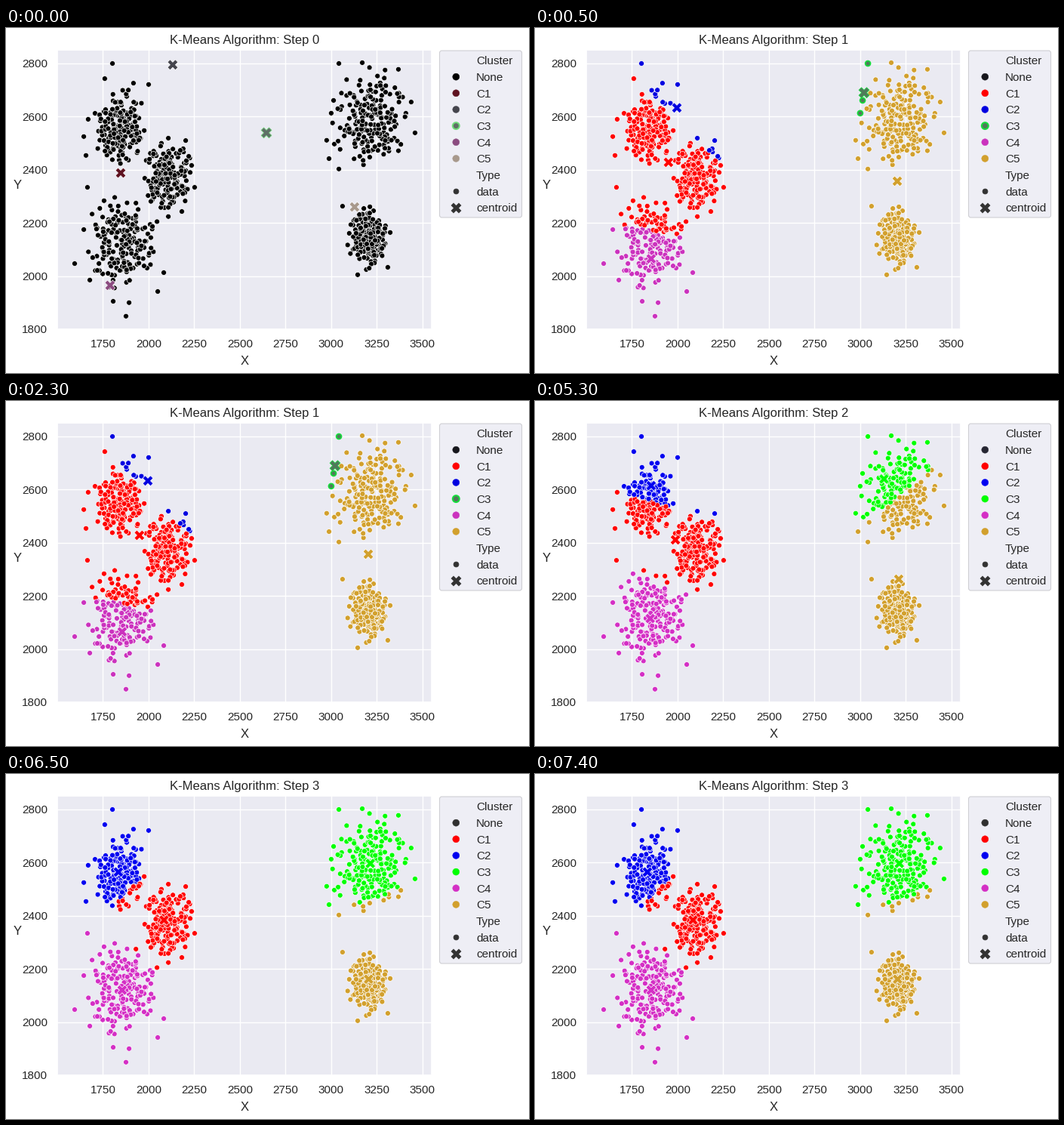
Write a matplotlib script that moves like this. It is 693 px wide and 457 px high and loops after 8 s.

```python
import numpy as np
import matplotlib.pyplot as plt
from matplotlib.animation import FuncAnimation
from matplotlib.patches import FancyBboxPatch

W, H, DPI = 693, 457, 100
INK = "#262626"
PANEL = "#eaeaf2"

plt.rcParams["font.family"] = "Liberation Sans"
plt.rcParams["text.color"] = INK

# Each blob: centre, spread, core size and a few stragglers
BLOBS = [
    ((1847, 2560), (66, 62), 213,
     [(1802, 2800), (1760, 2743), (2000, 2721), (1917, 2726),
      (1645, 2525), (1657, 2454), (1669, 2590), (1665, 2334)]),
    ((2102, 2378), (61, 56), 190,
     [(2108, 2519), (2203, 2510), (2252, 2334), (2108, 2224),
      (2046, 2205), (2182, 2243)]),
    ((1847, 2135), (82, 84), 187,
     [(1595, 2047), (1645, 2175), (2050, 1942), (2083, 2013),
      (1876, 1849), (1806, 1905), (1893, 1900), (1678, 1985)]),
    ((3207, 2595), (95, 86), 198,
     [(3042, 2800), (3170, 2803), (3368, 2778), (3438, 2655), (3459, 2539),
      (2975, 2511), (2988, 2442), (3013, 2661), (3000, 2613), (3042, 2403)]),
    ((3203, 2141), (51, 53), 197,
     [(3062, 2263), (3310, 2033), (3145, 2005), (3323, 2164)]),
]

CENTROIDS = [
    [(1847, 2388), (2132, 2795), (2645, 2539), (1789, 1965), (3128, 2260)],
    [(1950, 2428), (1996, 2633), (3021, 2690), (1855, 2065), (3203, 2357)],
    [(1988, 2411), (1855, 2615), (3130, 2640), (1850, 2115), (3211, 2263)],
]

# Colours per step: None, C1 ... C5
PALETTES = [
    ["#000000", "#5f1220", "#45454d", "#5f6f66", "#8b4c80", "#a8998c"],
    ["#16161c", "#ff0000", "#0000e0", "#4f7a5a", "#cb32be", "#d2a02d"],
    ["#262632", "#ff0000", "#0000f0", "#00ff00", "#d42fc5", "#d2a02d"],
    ["#303030", "#ff0000", "#0000f0", "#00ff00", "#d42fc5", "#d2a02d"],
]
GREEN_RIMS = {0: "#70dc7a", 1: "#14e03c"}

SCHEDULE = [0] + [1] * 6 + [2] * 6 + [3] * 3
INTERVAL = 500


def make_points():
    rng = np.random.default_rng(7)
    groups = []
    for centre, spread, count, stragglers in BLOBS:
        z = rng.normal(size=(3 * count, 2))
        z = z[np.hypot(z[:, 0], z[:, 1]) < 2.35][:count]
        groups += [np.array(centre) + z * spread, np.array(stragglers)]
    return rng.permutation(np.vstack(groups))


def nearest(points, centroids):
    gaps = points[:, None, :] - np.array(centroids)[None, :, :]
    return (gaps ** 2).sum(axis=2).argmin(axis=1) + 1


points = make_points()
labels = [np.zeros(len(points), int)] + [nearest(points, c) for c in CENTROIDS]
CENTROIDS.append([tuple(points[labels[3] == k].mean(axis=0)) for k in range(1, 6)])

fig = plt.figure(figsize=(W / DPI, H / DPI), dpi=DPI, facecolor="white")

# Plot area
ax = fig.add_axes([68 / W, 58 / H, 496 / W, 369.6 / H], facecolor=PANEL)
ax.set_xlim(1500, 3550)
ax.set_ylim(1800, 2850)
ax.set_xticks(range(1750, 3501, 250))
ax.set_yticks(range(1800, 2801, 200))
ax.set_axisbelow(True)
ax.grid(color="white", linewidth=1)
ax.tick_params(length=0, pad=9.5, labelsize=11, labelcolor=INK)
for spine in ax.spines.values():
    spine.set(color="white", linewidth=1.25)

dots = ax.scatter(*points.T, s=25, linewidth=0.5, edgecolor="white", zorder=3)
crosses = ax.scatter(*np.array(CENTROIDS[0]).T, s=100, marker="X",
                     linewidth=0.5, edgecolor="white", zorder=4)

# Labels and legend, laid out in pixels
page = fig.add_axes([0, 0, 1, 1])
page.set_xlim(0, W)
page.set_ylim(H, 0)
page.axis("off")
page.patch.set_visible(False)

title = page.text(316, 21.5, "", size=12, ha="center")
page.text(316, 445.5, "X", size=12, ha="center")
page.text(15, 213, "Y", size=12, ha="center")

page.add_patch(FancyBboxPatch((574.5, 30), 109, 221, facecolor="#eeeef5",
                              edgecolor="#cfcfd4", linewidth=0.8,
                              boxstyle="round,pad=0,rounding_size=3"))
names = ["Cluster", "None", "C1", "C2", "C3", "C4", "C5", "Type", "data", "centroid"]
rows = 43 + 21.65 * np.arange(len(names))
for name, y in zip(names, rows):
    page.text(623, y + 5.3, name, size=11)
keys = page.scatter([596.3] * 6, rows[1:7], s=42, linewidth=0.5, edgecolor="none")
page.scatter([596.3], [rows[8]], s=25, color="#333333", linewidth=0.5)
page.scatter([596.3], [rows[9]], s=100, marker="X", color="#333333", linewidth=0)


def update(frame):
    step = SCHEDULE[frame]
    colours = np.array(PALETTES[step])
    rims = np.array(["#ffffff"] * 6)
    key_rims = colours.copy()
    if step in GREEN_RIMS:
        rims[3] = key_rims[3] = GREEN_RIMS[step]

    title.set_text(f"K-Means Algorithm: Step {step}")
    dots.set_facecolor(colours[labels[step]])
    dots.set_edgecolor(rims[labels[step]])
    dots.set_linewidth(np.where(rims == "#ffffff", 0.5, 1.2)[labels[step]])
    crosses.set_offsets(CENTROIDS[step])
    crosses.set_facecolor(colours[1:])
    crosses.set_edgecolor(rims[1:])
    keys.set_facecolor(colours)
    keys.set_edgecolor(key_rims)
    keys.set_linewidth(np.where(rims == "#ffffff", 0.3, 1.4))
    return dots, crosses, keys, title


anim = FuncAnimation(fig, update, frames=len(SCHEDULE), interval=INTERVAL,
                     repeat=True, repeat_delay=0, blit=False)
plt.show()
```
